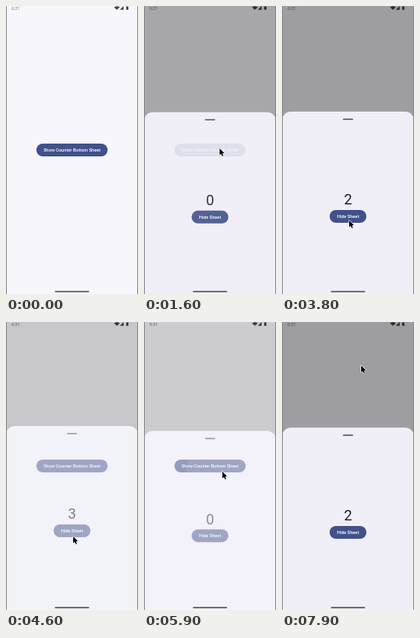
Animation, 165 px wide and 360 px high, one loop 8000 ms. Source, as an HTML page with a canvas:

```html
<!DOCTYPE html>
<html lang="en">
<head>
<meta charset="utf-8">
<title>Counter bottom sheet</title>
<style>
html, body { margin: 0; width: 100%; height: 100%; overflow: hidden; background: #f6f6fc; }
canvas { display: block; width: 165px; height: 360px; }
</style>
</head>
<body>
<canvas id="stage"></canvas>
<script>
const W = 165, H = 360, LOOP = 8000, STEP = 100;
const BLUE = '#415189', INK = '#1b1b1f';
const ratio = window.devicePixelRatio || 1;

function setUp(canvas) {
  canvas.width = W * ratio;
  canvas.height = H * ratio;
  const c = canvas.getContext('2d');
  c.scale(ratio, ratio);
  return c;
}

const stage = setUp(document.getElementById('stage'));
const layer = document.createElement('canvas');
const sheet = setUp(layer);

// Pointer tip: time, x, y
const pointerPath = [
  [100, 78, 200], [200, 68, 214], [400, 66, 213], [600, 52, 196],
  [800, 62, 160], [1000, 82, 168], [1200, 94.5, 177.5], [1700, 94.5, 178],
  [2100, 86, 266], [2400, 85, 276], [2900, 84, 269], [3500, 84, 268],
  [5000, 84, 268], [5400, 90, 222], [5700, 98, 187], [5900, 98, 187],
  [6200, 108, 168], [6500, 114.5, 141.5], [6700, 100, 100], [7000, 94, 19],
  [7200, 98, 49], [7500, 98, 49], [7900, 99, 54.5]
];

const visits = [
  { open: 1430, close: 4500 },
  { open: 5830, close: Infinity }
];

const clamp = v => Math.max(0, Math.min(1, v));
const ease = v => v * v * (3 - 2 * v);

function pointerAt(t) {
  if (t < pointerPath[0][0]) return null;
  const next = pointerPath.findIndex(p => p[0] > t);
  if (next < 0) return pointerPath[pointerPath.length - 1].slice(1);
  const a = pointerPath[next - 1], b = pointerPath[next];
  const k = ease((t - a[0]) / (b[0] - a[0]));
  return [a[1] + (b[1] - a[1]) * k, a[2] + (b[2] - a[2]) * k];
}

function sheetAt(t) {
  const visit = visits.find(v => t >= v.open && t < v.close + 300);
  if (!visit) return null;
  const enter = 1 - (1 - clamp((t - visit.open) / 250)) ** 2;
  const leave = 1 - clamp((t - visit.close) / 217);
  const end = Math.min(t, visit.close);
  return {
    alpha: enter * leave,
    shift: 8 * (1 - enter) - 4.3 * (1 - leave),
    count: Math.floor((end - visit.open + 30) / 1000)
  };
}

function pill(c, x, y, w, h, color, r = h / 2) {
  c.fillStyle = color;
  c.beginPath();
  c.roundRect(x, y, w, h, r);
  c.fill();
}

function text(c, value, x, y, size, color, weight = 400, align = 'center') {
  c.font = `${weight} ${size}px Roboto, sans-serif`;
  c.textAlign = align;
  c.fillStyle = color;
  c.fillText(value, x, y);
}

function button(c, label, x, y, w, ripple, origin) {
  pill(c, x, y, w, 16, BLUE);
  if (ripple > 0) {
    c.save();
    c.clip();
    c.fillStyle = 'rgba(255,255,255,.1)';
    c.beginPath();
    c.arc(origin[0], origin[1], 50 * ripple, 0, Math.PI * 2);
    c.fill();
    c.restore();
  }
  text(c, label, x + w / 2, y + 10, 5.65, '#fff', 500);
}

function shape(c, points, color) {
  c.fillStyle = color;
  c.beginPath();
  points.forEach(([x, y]) => c.lineTo(x, y));
  c.closePath();
  c.fill();
}

function statusBar(c) {
  text(c, '6:21', 7, 4.5, 5.4, '#77767b', 400, 'left');
  c.fillStyle = '#45454a';
  c.beginPath();
  c.moveTo(138.6, 4.8);
  c.arc(138.6, 4.8, 4.6, -Math.PI * .77, -Math.PI * .23);
  c.fill();
  shape(c, [[142.3, 4.8], [147, 4.8], [147, 0]], '#45454a');
  pill(c, 150.2, .4, 2.8, 4.4, '#45454a', .5);
}

function drawSheet(t, state) {
  sheet.clearRect(0, 0, W, H);
  sheet.fillStyle = 'rgba(0,0,0,.355)';
  sheet.fillRect(0, 0, W, H);
  sheet.save();
  sheet.translate(0, state.shift);
  pill(sheet, 0, 132, W, 260, '#f0eff8', 11.2);
  pill(sheet, 76.1, 140.7, 12.8, 1.6, '#47464f');
  text(sheet, state.count, 82.5, 248.4, 18, INK);
  const press = t >= 4400 && t < 4900 ? clamp((t - 4350) / 200) : 0;
  button(sheet, 'Hide Sheet', 59.5, 255, 46, press, [84, 268]);
  sheet.restore();
  stage.globalAlpha = state.alpha;
  stage.drawImage(layer, 0, 0, W, H);
  stage.globalAlpha = 1;
}

function drawPointer([x, y]) {
  stage.save();
  stage.translate(x, y);
  stage.beginPath();
  [[0, 0], [0, 8.4], [1.9, 6.7], [3.3, 9.8], [4.7, 9.2], [3.4, 6.2], [6, 6]]
    .forEach(([px, py]) => stage.lineTo(px, py));
  stage.closePath();
  stage.lineJoin = 'round';
  stage.lineWidth = 1.2;
  stage.strokeStyle = '#fff';
  stage.stroke();
  stage.fillStyle = '#000';
  stage.fill();
  stage.restore();
}

function draw(t) {
  stage.fillStyle = '#f6f6fc';
  stage.fillRect(0, 0, W, H);
  statusBar(stage);

  const tap = [1300, 5750].find(s => t >= s && t < s + 500);
  const press = tap ? clamp((t - tap + 30) / 200) : 0;
  const pointer = pointerAt(t);
  button(stage, 'Show Counter Bottom Sheet', 38, 172, 89, press, pointer);

  const state = sheetAt(t);
  if (state) drawSheet(t, state);

  pill(stage, 61, 356.2, 43, 1.6, '#46464b');
  stage.fillStyle = '#85858a';
  stage.fillRect(0, 0, 1, H);
  stage.fillRect(W - 1, 0, 1, H);
  if (pointer) drawPointer(pointer);
}

const start = performance.now();
function frame() {
  const t = (performance.now() - start) % LOOP;
  draw(Math.floor(t / STEP) * STEP);
  requestAnimationFrame(frame);
}
frame();
</script>
</body>
</html>
```
